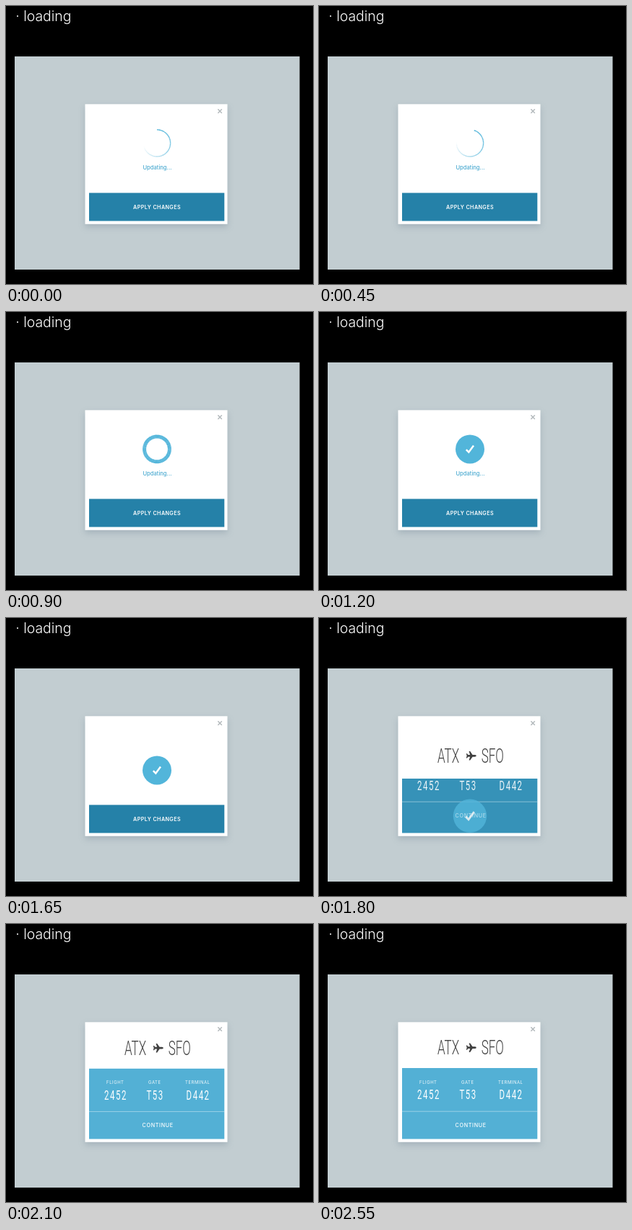
An HTML page for the animation above (3.4 s loop, 425x386 px).

```html
<!DOCTYPE html>
<html lang="en">
<head>
<meta charset="utf-8">
<title>loading</title>
<style>
  html, body { margin: 0; width: 100%; height: 100%; overflow: hidden; background: #000; }
  svg { display: block; width: 100%; height: 100%; font-family: Inter, "Liberation Sans", sans-serif; }
  text { fill: #fff; text-anchor: middle; }
  .title { font-size: 19.4px; font-weight: 300; text-anchor: start; }
  .card { filter: drop-shadow(0 4px 4px rgba(80, 105, 125, .25)); }
  .status { fill: #4dabd1; font-size: 7.6px; font-weight: 500; }
  .button { font-size: 7.2px; font-weight: 600; letter-spacing: .4px; }
  .next { font-size: 7.2px; font-weight: 500; letter-spacing: .65px; }
  .label { font-size: 6px; letter-spacing: .5px; fill-opacity: .92; }
  .narrow { font-family: Roboto, "Liberation Sans", sans-serif; }
  .code { fill: #444; font-size: 27.5px; font-weight: 300; }
  .value { font-size: 18.5px; letter-spacing: 2.5px; }
</style>
</head>
<body>
<svg viewBox="0 0 425 386" preserveAspectRatio="none">
  <rect width="425" height="386"/>
  <text class="title" x="13.3" y="21">· loading</text>
  <rect x="12" y="70" width="394.5" height="296" fill="#c2cdd1"/>
  <rect class="card" x="109.5" y="136.3" width="197" height="166.5" fill="#fff"/>
  <path d="M293.4 143.3l5.4 5.4m0-5.4l-5.4 5.4" stroke="#b3b9bc" stroke-width="1.5"/>

  <g id="ring" fill="none" stroke="#52b5da"></g>
  <text id="status" class="status" x="209.5" y="226.8">Updating...</text>

  <g id="route">
    <path transform="translate(210.8 -9.7)" fill="#404040"
      d="M7 0Q7-1.4 4.6-1.4H1.8L-1.6-6.2H-3.2L-1.7-1.4H-4.4L-5.8-3.1H-7L-6.1 0L-7 3.1H-5.8L-4.4 1.4H-1.7L-3.2 6.2H-1.6L1.8 1.4H4.6Q7 1.4 7 0Z"/>
  </g>

  <rect id="panel" x="115" width="187.3"/>
  <text id="apply" class="button" x="209" y="281.8">APPLY CHANGES</text>
  <g id="labels"></g>
  <g id="values"></g>
  <path id="rule" d="M115 0H302.3" stroke="#fff" stroke-opacity=".45" stroke-width=".9"/>
  <g id="badge">
    <circle r="20" fill="#52b5da"/>
    <path d="M-5.2 .8L-1.7 4.3L5-4.8" fill="none" stroke="#fff" stroke-width="2.5"/>
  </g>
  <text id="next" class="next" x="210.2">CONTINUE</text>
</svg>
<script>
const LOOP = 3400, STEP = 150, SEGMENTS = 60, CONDENSE = 0.62;
const NS = "http://www.w3.org/2000/svg";
const $ = id => document.getElementById(id);

function add(parent, tag, attrs, content = "") {
  const el = document.createElementNS(NS, tag);
  set(el, attrs);
  el.textContent = content;
  return parent.appendChild(el);
}

function set(el, attrs) {
  for (const key in attrs) el.setAttribute(key, attrs[key]);
}

// Condensed display lettering
function narrow(parent, kind, x, str) {
  add(parent, "text", {
    class: "narrow " + kind,
    transform: `translate(${x} 0) scale(${CONDENSE} 1)`
  }, str);
}

narrow($("route"), "code", 179, "ATX");
narrow($("route"), "code", 240.3, "SFO");

[["FLIGHT", "2452", 151.3], ["GATE", "T53", 205.8], ["TERMINAL", "D442", 265.3]]
  .forEach(([label, value, x]) => {
    add($("labels"), "text", { class: "label", x }, label);
    narrow($("values"), "value", x + 0.8, value);
  });

const segments = Array.from({ length: SEGMENTS }, () => add($("ring"), "path", {}));

// Linear interpolation through [time, value] pairs
function track(t, ...keys) {
  if (t <= keys[0][0]) return keys[0][1];
  for (let i = 1; i < keys.length; i++) {
    const [t0, a] = keys[i - 1], [t1, b] = keys[i];
    if (t <= t1) return a + (b - a) * (t - t0) / (t1 - t0);
  }
  return keys[keys.length - 1][1];
}

function mix(a, b, k) {
  return `rgb(${a.map((v, i) => Math.round(v + (b[i] - v) * k))})`;
}

function point(deg, r) {
  const a = deg * Math.PI / 180;
  return `${(209 + r * Math.sin(a)).toFixed(2)} ${(190.4 - r * Math.cos(a)).toFixed(2)}`;
}

function drawRing(t) {
  set($("ring"), {
    visibility: t < 1050 ? "visible" : "hidden",
    "stroke-width": track(t, [450, 1.4], [600, 2.2], [750, 3.8], [900, 5])
  });
  const start = t < 450 ? 0 : track(t, [450, 18], [600, 34], [900, 60]);
  const span = track(t, [450, 255], [600, 290], [750, 345], [900, 360]);
  const fade = track(t, [450, 1], [600, 0.75], [750, 0.35], [900, 0]);
  const r = track(t, [450, 18.6], [600, 18.3], [900, 17.4]);
  const step = span / SEGMENTS;
  segments.forEach((seg, i) => {
    const a = start + i * step;
    set(seg, {
      d: `M${point(a, r)}A${r} ${r} 0 0 1 ${point(a + step + 0.3, r)}`,
      opacity: 1 - fade * (i / SEGMENTS) ** 1.3
    });
  });
}

function drawBadge(t) {
  const y = track(t, [1500, 190.4], [1650, 211.4], [1800, 274.8], [1950, 279]);
  const scale = track(t, [1650, 1], [1800, 1.16], [1950, 1.4]);
  set($("badge"), {
    transform: `translate(209 ${y}) scale(${scale})`,
    opacity: t < 1050 ? 0 : track(t, [1650, 1], [1800, 0.8], [1950, 0.12], [2100, 0])
  });
}

function drawTicket(t) {
  const open = t >= 1800;
  const top = track(t, [1650, 259.5], [1800, 223], [1950, 203.8], [2100, 200.8], [2250, 200]);
  const tint = track(t, [1650, 0], [1800, 0.36], [1950, 0.95], [2100, 1]);
  set($("panel"), { y: top, height: 298.5 - top, fill: mix([37, 129, 168], [83, 176, 213], tint) });
  set($("apply"), { opacity: open ? 0 : 1 });

  const show = (id, y, opacity = 1) =>
    set($(id), { transform: `translate(0 ${y})`, opacity: open ? opacity : 0 });
  show("route", track(t, [1800, 201], [1950, 185.3], [2100, 181.9], [2250, 181.4]));
  show("labels", track(t, [1950, 222.2], [2250, 221.6]), track(t, [1800, 0], [1950, 0.95], [2100, 1]));
  show("values", track(t, [1800, 238.6], [1950, 243.9], [2250, 243.2]), track(t, [1800, 0.9], [1950, 1]));
  show("rule", track(t, [1800, 255.2], [1950, 260.7], [2250, 260.2]));
  show("next", track(t, [1800, 277.4], [1950, 282.6], [2250, 282]), track(t, [1800, 0.55], [1950, 1]));
}

function draw(time) {
  const t = Math.floor(time % LOOP / STEP) * STEP;
  drawRing(t);
  drawBadge(t);
  drawTicket(t);
  set($("status"), { opacity: track(t, [1350, 1], [1500, 0.5], [1650, 0]) });
}

const begin = performance.now();
function tick() {
  draw(performance.now() - begin);
  requestAnimationFrame(tick);
}
tick();
</script>
</body>
</html>
```
